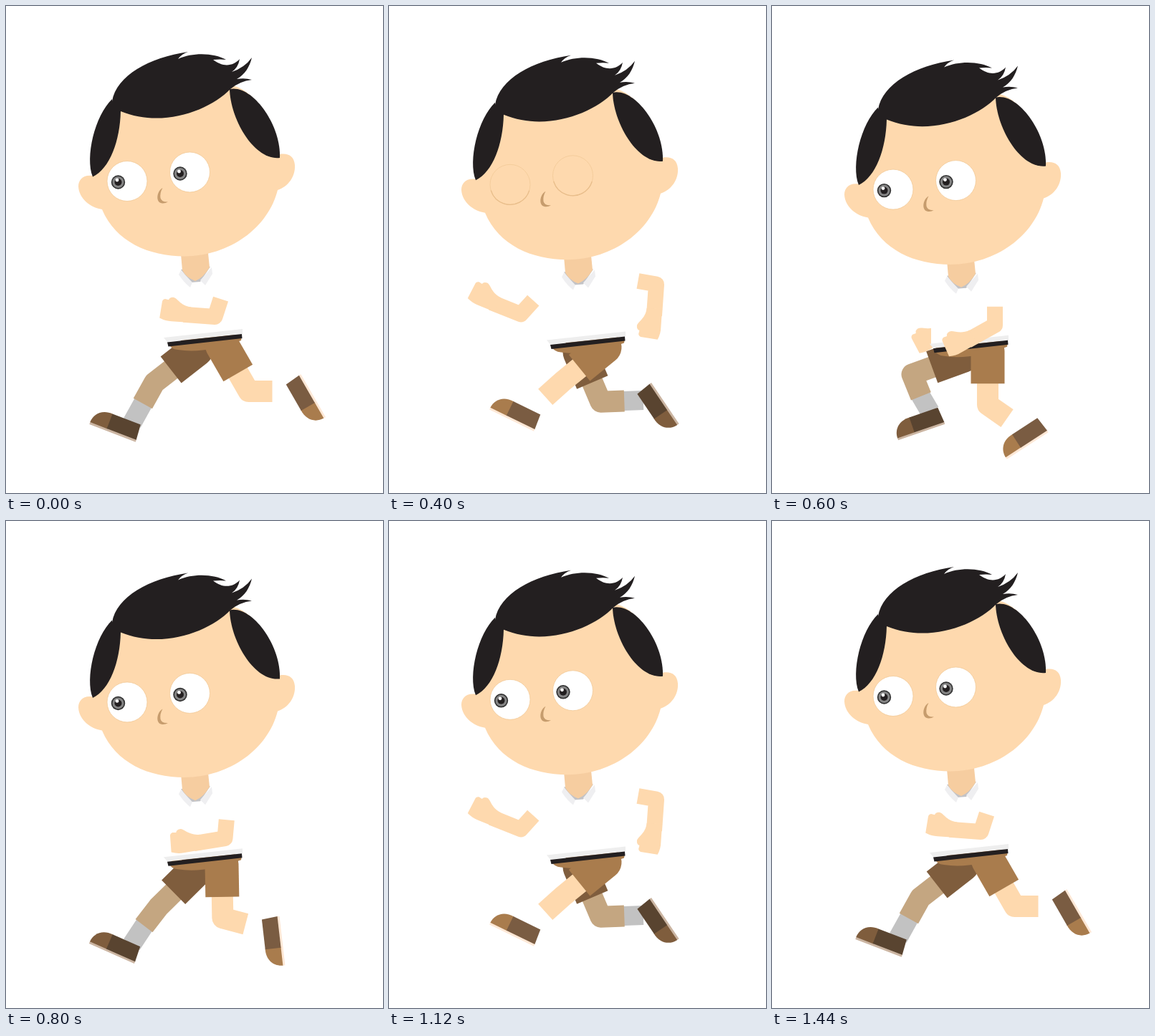
These frames come from a looping animation (526x680 px, 1.48 s). An HTML page with a canvas:

```html
<!DOCTYPE html>
<html lang="en">
<head>
<meta charset="utf-8">
<title>Running boy</title>
<style>
  html, body { margin: 0; width: 100%; height: 100%; overflow: hidden; background: #fff; }
  canvas { display: block; width: 526px; height: 680px; }
</style>
</head>
<body>
<canvas id="stage" width="526" height="680"></canvas>
<script>
const ctx = document.getElementById('stage').getContext('2d');
const LOOP = 1480, STRIDE = 720, STEP = 40;
const SKIN = '#fed9ae', INK = '#231f20', SHORTS = '#a97c4d', DARK_SHORTS = '#7f5d3d';

// Arm keys: time, upper arm angle, forearm angle (0 = down, positive = right)
const nearArm = {
  shoulder: [311, 374],
  keys: [[0, -18, -94], [200, 33, -38], [240, 43.5, -22], [400, 80, -4], [600, 0, -61]]
};
const farArm = {
  shoulder: [226, 380],
  keys: [[0, 80, -4], [200, -3, -85], [240, -15, -98], [400, -42, -112], [600, 40, -57]]
};

// Leg keys: time, thigh angle, shin angle, ankle direction, ankle reach, shoe tilt
const nearLeg = {
  hip: [301, 473], shorts: SHORTS, skin: SKIN, sock: '#fff',
  toe: SHORTS, shoe: '#7a5c42', sole: '#fee8d6',
  keys: [
    [0, 30, 90, 90, 60, -120], [200, -63, 22, 25.5, 58, -25], [240, -68, -11, -11, 57, -2],
    [325, -60, -30, -30, 64, 21], [400, -51, -48, -45, 61, 26], [525, -15, 40, 46, 69, 3],
    [600, 0, 55, 66, 66, -33], [680, 25, 88, 88, 60, -118]
  ]
};
const farLeg = {
  hip: [266, 480], shorts: DARK_SHORTS, skin: '#c4a681', sock: '#c2c2c2',
  toe: DARK_SHORTS, shoe: '#594430', sole: '#cbb5a2',
  keys: [
    [0, -52, -29, -29, 64, 21], [75, -46, -38, -36, 64, 24], [140, -32, 5, 8, 72, 8],
    [200, -15, 40, 46.6, 69, 3], [240, 4, 44, 48, 67, 0], [400, 23, 92, 92, 59.5, -124],
    [600, -70, 22, 25.6, 58, -19], [635, -70, -8, -11, 57, -2]
  ]
};

const rad = deg => deg * Math.PI / 180;
const along = ([x, y], deg, d) => [x + Math.sin(rad(deg)) * d, y + Math.cos(rad(deg)) * d];

// Smooth cyclic interpolation that never overshoots its keys
function pose(keys, t) {
  const n = keys.length;
  const key = i => {
    const turn = Math.floor(i / n), k = keys[i - turn * n];
    return [k[0] + turn * STRIDE, ...k.slice(1)];
  };
  let i = 0;
  while (i < n - 1 && keys[i + 1][0] <= t) i++;
  const [p, a, b, q] = [key(i - 1), key(i), key(i + 1), key(i + 2)];
  const span = b[0] - a[0], u = (t - a[0]) / span;
  const slope = (m, k, c) => (k[c] - m[c]) / (k[0] - m[0]);
  const blend = (r, s) => r * s <= 0 ? 0 : 2 * r * s / (r + s);
  return a.slice(1).map((v, j) => {
    const c = j + 1, mid = slope(a, b, c);
    const m0 = blend(slope(p, a, c), mid) * span;
    const m1 = blend(mid, slope(b, q, c)) * span;
    const d = b[c] - v;
    return v + m0 * u + (3 * d - 2 * m0 - m1) * u * u + (m0 + m1 - 2 * d) * u * u * u;
  });
}

function headBob(t) {
  const keys = [[0, 0], [40, 4.8], [180, 17.5], [240, 11.6], [360, 0]];
  const p = t % 360;
  const i = keys.findIndex(k => k[0] > p);
  const [a, b] = [keys[i - 1], keys[i]];
  return a[1] + (b[1] - a[1]) * (p - a[0]) / (b[0] - a[0]);
}

function fill(color, d) {
  ctx.fillStyle = color;
  ctx.fill(new Path2D(d));
}

function disc(color, x, y, r) {
  ctx.fillStyle = color;
  ctx.beginPath();
  ctx.arc(x, y, r, 0, 7);
  ctx.fill();
}

function limb(color, width, ...points) {
  ctx.strokeStyle = color;
  ctx.lineWidth = width;
  ctx.lineJoin = 'round';
  ctx.beginPath();
  points.forEach(p => ctx.lineTo(...p));
  ctx.stroke();
}

function at([x, y], deg, draw) {
  ctx.save();
  ctx.translate(x, y);
  ctx.rotate(rad(deg));
  draw();
  ctx.restore();
}

function drawArm(arm, t) {
  const [upper, fore] = pose(arm.keys, t);
  const elbow = along(arm.shoulder, upper, 63);
  limb(SKIN, 22, along(arm.shoulder, upper, 37), elbow, along(elbow, fore, 44));
  at(elbow, -fore, () => fill(SKIN,
    'M-11 34C-12 50-23 54-23 60Q-23 65-19 66L-20 71Q-19 75-15 75L7 77Q11 68 10.500 60L10.500 34Z'));
}

function drawShoe(leg, ankle, tilt) {
  at(ankle, tilt, () => {
    ctx.translate(-12, -4);
    fill(leg.sole, 'M-43 23H26V27H-43Z');
    fill(leg.toe, 'M-17 2C-34 1-43 12-43 24H-17Z');
    fill(leg.shoe, 'M-18 2H24L26 24H-18Z');
  });
}

function drawLeg(leg, t) {
  const [thigh, shin, dir, reach, tilt] = pose(leg.keys, t);
  const knee = along(leg.hip, thigh, 75);
  const calf = along(knee, shin, 33);
  const ankle = along(knee, dir, reach);
  limb(leg.sock, 27, along(knee, shin, 31), calf, ankle);
  limb(leg.skin, 30, along(leg.hip, thigh, 42), knee, calf);
  drawShoe(leg, ankle, tilt);
  at(leg.hip, -thigh, () => fill(leg.shorts,
    'M-23.500 0A23.500 23.500 0 0 1 23.500 0V45.500H-23.500Z'));
}

function drawTorso() {
  fill('#fff', 'M241 374L222 390V464L330 452V385L288 368Z');
  fill('#eeeeee', 'M220 463L330 451L330 458L225 469Z');
  fill(INK, 'M225 469.500L329 458L329.500 464L226.500 475.500Z');
  fill('#c3c3c6', 'M244 368L258 386L271 385L285 364Z');
  fill('#f6cda0', 'M243 335H281L284 365Q276 379 264 384Q251 379 246 369Z');
  fill('#efeff1', 'M244 369L260 386L257 393Q248 386 241 375Z');
  fill('#efeff1', 'M287 365L288 374L278 390L271 383Z');
}

function drawEye(x, y, px, py, closed) {
  disc(closed ? SKIN : '#fff', x, y, 28);
  ctx.lineWidth = 0.8;
  ctx.strokeStyle = '#f2c997';
  ctx.stroke();
  if (closed) {
    ctx.lineWidth = 1.3;
    ctx.strokeStyle = '#e8bd8a';
    ctx.beginPath();
    ctx.arc(x, y, 28, 0.3, 2.85);
    ctx.stroke();
    return;
  }
  disc('#333', px, py, 9.7);
  disc('#858585', px, py, 8);
  disc(INK, px, py, 5);
  disc('#fff', px - 1.5, py - 3, 2.4);
}

function drawHead(closed) {
  fill(SKIN, 'M121 237C107 235 101 243 101 252C102 269 117 281 134 284C153 329 199 349.500 249 349.500' +
    'C313 349 366 309 379 257C394 252 404 238 403 222C402 209 393 205 382 207' +
    'C376 160 345 115 312 110L160 140Z');
  fill(INK, 'M148 133C154 97 200 72 254 64Q245 67 240 74C262 64 291 66 307 75Q299 74 289 75' +
    'C303 86 317 84 326 74Q324 86 315 92Q333 86 343 72C340 85 333 96 322 102Q333 100 343 103' +
    'Q326 105 313 116C284 146 218 171 160 147C159 188 145 227 121 238.500C110 211 124 153 148 130Z');
  fill(INK, 'M312 116C343 109 384 165 382 212C346 216 313 158 312 116Z');
  drawEye(169, 244.5, 156.5, 246, closed);
  drawEye(256.5, 232, 243, 234, closed);
  fill('#c69c6d', 'M218.500 254C210 259 209 273 216 275Q221 276.500 226 273.500Q217 274 215.500 268Q214.500 261 218.500 254Z');
}

function draw(time) {
  const t = time % STRIDE;
  const bob = headBob(t);
  const blinking = time >= 360 && time < 480;

  ctx.fillStyle = '#fff';
  ctx.fillRect(0, 0, 526, 680);

  ctx.save();
  ctx.translate(0, bob * 0.75);
  drawArm(farArm, t);
  drawLeg(farLeg, t);
  fill(SHORTS, 'M227 472L329 461L328 467Q277 486 240 480Q230 479 227 472Z');
  drawLeg(nearLeg, t);
  drawTorso();
  drawArm(nearArm, t);
  ctx.restore();

  ctx.save();
  ctx.translate(0, bob);
  drawHead(blinking);
  ctx.restore();
}

function tick() {
  draw(Math.floor(performance.now() % LOOP / STEP) * STEP);
  requestAnimationFrame(tick);
}
tick();
</script>
</body>
</html>
```
